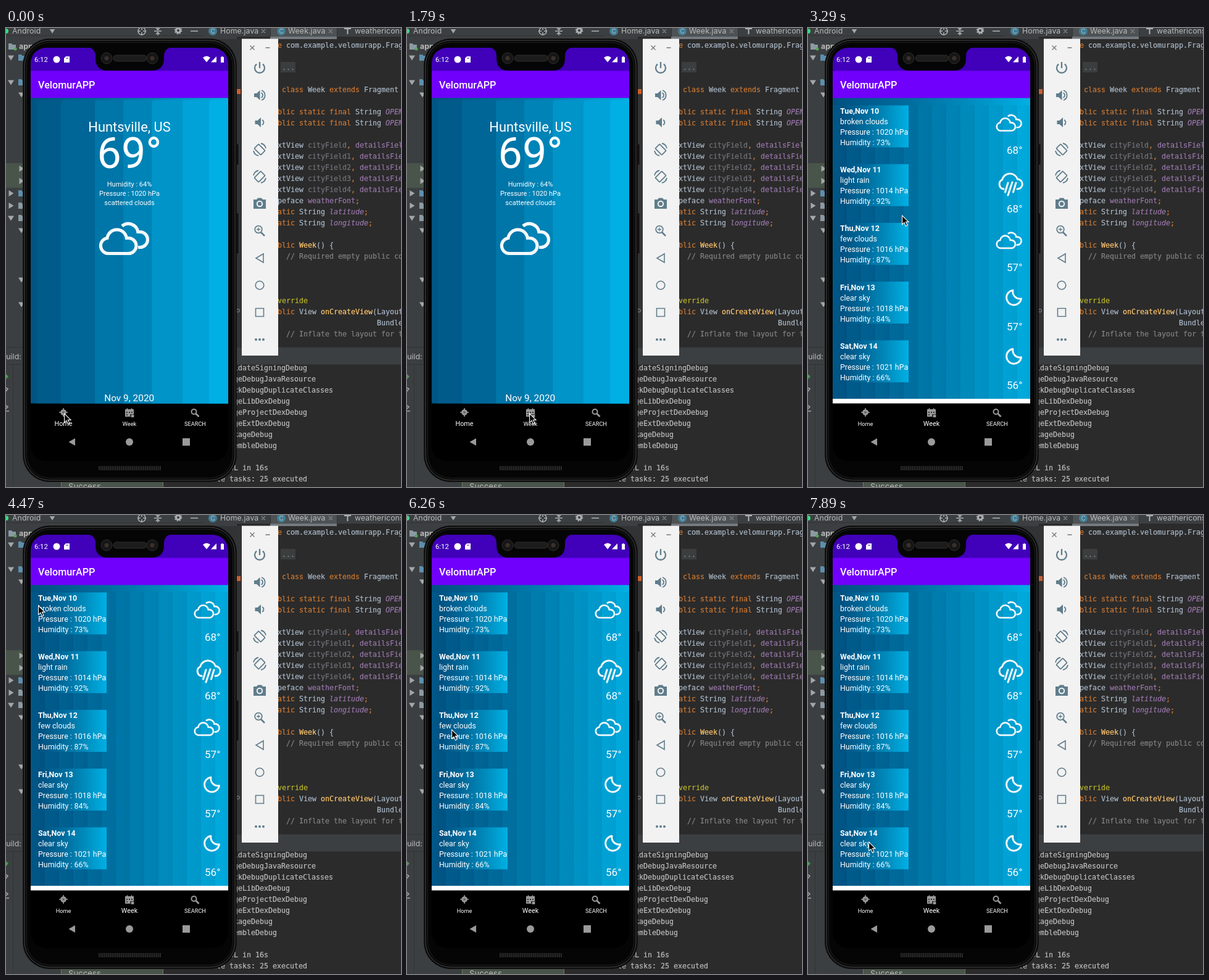
An HTML page for the animation above (8000 ms loop, 640 by 744 pixels).

```html
<!DOCTYPE html>
<html lang="en">
<head>
<meta charset="utf-8">
<title>Weather app demo</title>
<style>
html, body { margin: 0; width: 100%; height: 100%; overflow: hidden; background: #2b2b2b; }
svg { display: block; }
text { white-space: pre; }
.phone text { font-family: Roboto, sans-serif; fill: #fff; }
.code text { font: 11.63px "DejaVu Sans Mono", Menlo, monospace; }
.code { color: #a9b7c6; }
.code text, .code tspan { fill: currentColor; stroke: currentColor; stroke-width: .22px; }
.ide text { font: 12.3px Inter, sans-serif; fill: #bbb; letter-spacing: .1px; }
.k { color: #cc7832; }
.f { color: #9876aa; }
.i { font-style: italic; }
.m { color: #ffc66d; }
.c { color: #808080; }
.u { color: #72737a; }
.a { color: #bbb529; }
#log { color: #bbb; }
.line { fill: none; stroke: #f4f8fa; }
.mid { text-anchor: middle; }
.tools { fill: none; stroke: #607d8b; stroke-width: 1.8; }
.tools .s { fill: #607d8b; stroke: none; }

.home, .week, .big, .small, .cursor { animation: 8s step-end -2ms infinite; }
.home { animation-name: leave; }
.week { animation-name: enter; }
.big { animation-name: shrink; }
.small { animation-name: grow; }
.cursor { animation-name: move; }
@keyframes leave { 0% { visibility: visible } 31.75%, 100% { visibility: hidden } }
@keyframes enter { 0% { visibility: hidden } 31.75%, 100% { visibility: visible } }
@keyframes shrink { 0% { font-size: 10.8px } 31.75% { font-size: 10px } 33.625%, 100% { font-size: 9.2px } }
@keyframes grow { 0% { font-size: 9.2px } 31.75% { font-size: 10px } 33.625%, 100% { font-size: 10.8px } }
@keyframes move {
  0% { transform: translate(94px, 624px) }
  1.875% { transform: translate(91px, 624px) }
  3.75% { transform: translate(89px, 624px) }
  13.125% { transform: translate(95px, 623px) }
  15% { transform: translate(120px, 621px) }
  16.875% { transform: translate(152px, 620px) }
  18.625% { transform: translate(180px, 621px) }
  20.5% { transform: translate(194px, 623px) }
  22.375% { transform: translate(198px, 624px) }
  37.375% { transform: translate(202px, 570px) }
  39.25% { transform: translate(172px, 400px) }
  41.125% { transform: translate(152px, 303px) }
  50.375% { transform: translate(134px, 276px) }
  52.25% { transform: translate(98px, 218px) }
  54.125% { transform: translate(64px, 162px) }
  55.875% { transform: translate(52px, 146px) }
  57.75% { transform: translate(51px, 148px) }
  59.625% { transform: translate(52px, 156px) }
  61.5% { transform: translate(54px, 168px) }
  63.375% { transform: translate(57px, 182px) }
  65.25% { transform: translate(59px, 200px) }
  67.125% { transform: translate(61px, 222px) }
  69% { transform: translate(64px, 246px) }
  70.875% { transform: translate(66px, 268px) }
  72.75% { transform: translate(69px, 292px) }
  74.625% { transform: translate(71px, 315px) }
  76.5% { transform: translate(72px, 334px) }
  78.25% { transform: translate(72px, 347px) }
  83.875% { transform: translate(72px, 372px) }
  85.75% { transform: translate(72px, 422px) }
  87.5% { transform: translate(72px, 455px) }
  95% { transform: translate(77px, 474px) }
  96.75% { transform: translate(89px, 506px) }
  98.625%, 100% { transform: translate(98px, 529px) }
}
</style>
</head>
<body>
<svg width="640" height="744" viewBox="0 0 640 744">
<defs>
  <linearGradient id="sky">
    <stop stop-color="#005080"/><stop offset=".35" stop-color="#006a9b"/>
    <stop offset=".65" stop-color="#0088b9"/><stop offset="1" stop-color="#00b0e4"/>
  </linearGradient>
  <linearGradient id="saw" gradientUnits="userSpaceOnUse" x1="40" x2="63" spreadMethod="repeat">
    <stop stop-color="#00b0e4" stop-opacity=".07"/><stop offset="1" stop-color="#003860" stop-opacity=".1"/>
  </linearGradient>
  <clipPath id="screen"><rect x="40" y="32" width="320" height="670" rx="25"/></clipPath>
  <path id="open" d="M-5-3.500H5L0 4.500Z" fill="#a4a6a8"/>
  <path id="shut" d="M-3.500-5V5L4.500 0Z" fill="#a4a6a8"/>
  <path id="folder" d="M0-5H5L6.500-3H12V5H0Z"/>
  <g id="clouds" class="line" stroke-width="5.100">
    <path d="M165 365.500H198.500A12.500 12.500 0 0 0 198.500 340.500H195.300A15.800 15.800 0 0 0 164 340.500A12.600 12.600 0 0 0 165 365.500Z"/>
    <path d="M188 321A15.800 15.800 0 0 1 213.800 330.500H217A12.500 12.500 0 0 1 217 355.500H214"/>
  </g>
  <use id="cloudy" href="#clouds" transform="translate(225.400 -25) scale(.524)"/>
  <g id="rain" class="line" stroke-width="3" stroke-linecap="round" transform="translate(0 -95.200)">
    <path d="M317 261A8 8 0 0 1 314.500 246A13 13 0 0 1 339.500 245A8 8 0 0 1 339 261"/>
    <path d="M324 251L319.500 266M331 250L324 271M337 251L332.500 266"/>
  </g>
  <path id="moon" class="line" stroke-width="2.900" stroke-linejoin="round" d="M332 141.500A12 12 0 1 0 345.500 155A11.500 11.500 0 0 1 332 141.500Z"/>
  <g id="turn">
    <rect x="-5" y="-7.500" width="10" height="15" rx="1" transform="rotate(-45)"/>
    <path d="M2-10A10.200 10.200 0 0 1 10-2M-2 10A10.200 10.200 0 0 1-10 2"/>
  </g>
</defs>

<g class="ide">
  <path fill="#3c3f41" d="M0 0H640V14H374V18H0Z"/>
  <path fill="#3c3f41" d="M0 0H322V744H0Z"/>
  <path fill="#313335" d="M322 18H390V518H322Z"/>
  <path fill="#4e5254" d="M428 0H536V14H428Z"/>
  <path fill="#747a80" d="M428 14H536V18H428Z"/>
  <path fill="#323232" d="M0 12H320V13H0ZM428 0H429V14H428ZM536 0H537V14H536Z"/>
  <circle cx="0" cy="5" r="4" fill="#3ddc84"/>
  <text x="10" y="9">Android</text>
  <use href="#open" transform="translate(75 5) scale(.85)"/>
  <g fill="none" stroke="#afb1b3" stroke-width="1.500">
    <path d="M220-2V3M220 7V12M213 5H218M222 5H227M240 5H252M246-2V3M246 12V7M243 0L246 3L249 0M243 10L246 7L249 10M299 5H311"/>
    <circle cx="220" cy="5" r="6"/>
    <circle cx="279" cy="4" r="3.500" stroke-width="3"/>
    <circle cx="279" cy="4" r="5.500" stroke-dasharray="2.200 2.100"/>
    <path stroke="#7d8082" d="M414 2L420 8M420 2L414 8M523 2L529 8M529 2L523 8"/>
  </g>
  <circle cx="335" cy="5" r="7" fill="#3f7d96"/>
  <circle cx="446" cy="5" r="7" fill="#3f7d96"/>
  <text x="331.500" y="8.500" style="font-size:10px">C</text>
  <text x="442.500" y="8.500" style="font-size:10px">C</text>
  <text x="347" y="9">Home.java</text>
  <text x="457" y="9">Week.java</text>
  <path d="M548 1H559M553.500 1V10" stroke="#afb1b3" stroke-width="2"/>
  <text x="565" y="9">weathericons</text>

  <path fill="#49544a" d="M0 219H40V259H0Z"/>
  <use href="#folder" x="4" y="30" fill="#8b9aa3"/>
  <circle cx="15" cy="34" r="2.500" fill="#57a55a"/>
  <text x="21" y="34" style="font-weight:700">app</text>
  <g fill="#5c8fae">
    <use href="#folder" x="20" y="48"/><use href="#folder" x="20" y="88"/><use href="#folder" x="20" y="268"/>
  </g>
  <g fill="#8b9aa3"><use href="#folder" x="20" y="288"/><use href="#folder" x="20" y="308"/></g>
  <use href="#open" x="8" y="48"/><use href="#open" x="8" y="88"/><use href="#open" x="8" y="308"/>
  <use href="#shut" x="8" y="268"/><use href="#shut" x="8" y="288"/>
  <use href="#open" x="25" y="108"/><use href="#open" x="25" y="328"/><use href="#open" x="25" y="408"/><use href="#open" x="25" y="448"/>
  <use href="#shut" x="25" y="228"/><use href="#shut" x="25" y="248"/>

  <path fill="#3c3f41" d="M0 518H640V545H0Z"/>
  <path fill="#323232" d="M0 517H640V518H0ZM0 545H640V546H0ZM11 546H12V744H11Z"/>
  <text x="-8" y="537">Build:</text>
  <path fill="#499c54" d="M0 561L4 565L0 569Z"/>
  <path d="M-2 582L3 585L-1 590M-3 610L3 614L-1 618M-2 621H5" fill="none" stroke="#a4a6a8" stroke-width="1.500"/>
  <path fill="#2b2b2b" d="M254 546H400V744H254Z"/>
  <path fill="#49544a" stroke="#6a7a63" d="M89.500 734.500H254.500V750H89.500Z"/>
  <text x="101" y="748" style="font-size:13px">Success</text>
  <path fill="#c75f2f" d="M374 99H380V107H374Z"/>
  <circle cx="376" cy="458" r="2.500" fill="none" stroke="#8a8d90"/>
</g>

<g class="code">
  <text x="440" y="32"><tspan class="k">e</tspan> com.example.velomurapp.Frag</text>
  <path fill="#3b3d3e" d="M445 55H469V72H445Z"/>
  <text x="447" y="68" class="c">...</text>
  <text x="447" y="104"><tspan class="k">class</tspan> Week <tspan class="k">extends</tspan> Fragment</text>
  <text x="426" y="140"><tspan class="k">public static final</tspan> String <tspan class="f i">OPEN</tspan></text>
  <text x="426" y="158"><tspan class="k">public static final</tspan> String <tspan class="f i">OPEN</tspan></text>
  <g id="fields"></g>
  <text x="426" y="284">Typeface <tspan class="f">weatherFont</tspan><tspan class="k">;</tspan></text>
  <text x="426" y="302"><tspan class="k">static</tspan> String <tspan class="f i">latitude</tspan><tspan class="k">;</tspan></text>
  <text x="426" y="320"><tspan class="k">static</tspan> String <tspan class="f i">longitude</tspan><tspan class="k">;</tspan></text>
  <text x="426" y="356"><tspan class="k">public</tspan> <tspan class="m">Week</tspan>() {</text>
  <text x="454" y="374" class="c">// Required empty public constructor</text>
  <text x="426" y="446" class="a">@Override</text>
  <text x="426" y="464"><tspan class="k">public</tspan> View <tspan class="m">onCreateView</tspan>(LayoutInflater</text>
  <text x="601" y="482">Bundle</text>
  <text x="454" y="500" class="c">// Inflate the layout for this</text>
  <g id="log"></g>
</g>

<g class="phone">
  <path fill="#111" stroke="#444" stroke-width=".6" d="M371 188H377V222H371ZM371 300H377V366H371Z"/>
  <rect x="27.500" y="17.500" width="346" height="718" rx="43" fill="#0a0a0a" stroke="#141414"/>
  <rect x="30" y="20" width="341" height="713" rx="41" fill="none" stroke="#484848"/>
  <rect x="33.500" y="23.500" width="334" height="706" rx="38" fill="#050505" stroke="#1e1e1e"/>
  <g clip-path="url(#screen)">
    <path fill="#4100b9" d="M40 32H360V70H40Z"/>
    <path fill="#7000fb" d="M40 69.500H360V114H40Z"/>
    <path fill="#000" d="M40 608H360V702H40Z"/>
  </g>
  <path fill="#050505" d="M130 31Q145 32 145 46V49Q145 69 165 69H236Q256 69 256 49V46Q256 32 271 31Z"/>
  <rect x="174" y="44" width="54" height="10" rx="5" fill="#1c1c1c" stroke="#2d2d2d"/>
  <g fill="#161616" stroke="#2e2e2e"><circle cx="163" cy="49" r="9"/><circle cx="237" cy="49" r="9"/></g>
  <g fill="#3a302b"><circle cx="163" cy="49" r="3.500"/><circle cx="237" cy="49" r="3.500"/></g>
  <path d="M150 713.500H252" stroke="#2a2a2a" stroke-width="7" stroke-dasharray="2 1"/>

  <text x="46" y="55" font-size="11.300">6:12</text>
  <g fill="#fff">
    <circle cx="82" cy="51" r="5.500"/>
    <path d="M97 46H103V56H94V49ZM319 48Q325 43 331 48L325 55.500ZM341 46V55.500H332ZM348 47H349.500V46H351.500V47H353V56H348Z"/>
  </g>
  <path d="M98 48V50M100 48V50" stroke="#4100b9"/>
  <text x="52" y="98" font-size="16.200" font-weight="500">VelomurAPP</text>

  <g class="home">
    <path fill="#005583" d="M40 113.500H360V608.500H40Z"/>
    <path fill="url(#sky)" d="M40 113.500H360V117H40Z"/>
    <g id="bands"></g>
    <path d="M236.500 118V608" stroke="#00a0d0" stroke-opacity=".5"/>
    <g class="mid">
      <text x="200" y="167.500" font-size="21.900">Huntsville, US</text>
      <text x="200" y="227" font-size="70">69°</text>
      <g font-size="11">
        <text x="200" y="257">Humidity : 64%</text>
        <text x="200" y="271.500">Pressure : 1020 hPa</text>
        <text x="200" y="286.500">scattered clouds</text>
      </g>
      <text x="199.700" y="604.500" font-size="15.400">Nov 9, 2020</text>
    </g>
    <use href="#clouds"/>
  </g>

  <g class="week">
    <path fill="url(#sky)" d="M40 113.500H360V601H40Z"/>
    <path fill="url(#saw)" d="M40 125H360V601H40Z"/>
    <path fill="#fff" d="M40 601H360V608.500H40Z"/>
    <g id="days" font-size="12.400"></g>
  </g>

  <g fill="#9a9a9a">
    <circle cx="93" cy="623" r="4.800"/>
    <path d="M92.200 616H93.800V630H92.200ZM86 622.200H100V623.800H86Z"/>
    <circle cx="93" cy="623" r="2" fill="#666"/>
    <path d="M193 618H195.500V616.500H197.500V618H202.500V616.500H204.500V618H207V630H193Z"/>
    <path fill="#333" d="M195 622H197V624H195ZM199 622H201V624H199ZM203 622H205V624H203ZM195 626H197V628H195ZM201 626H208V631H201Z"/>
    <path d="M203 627H207V631H203Z"/>
    <path d="M112 665V677L101.500 671ZM286 665H298V677H286Z"/>
    <circle cx="200" cy="671" r="6"/>
  </g>
  <g fill="none" stroke="#9a9a9a" stroke-width="2"><circle cx="304.500" cy="622" r="4"/><path d="M307.500 625L312.500 630" stroke-width="2.600"/></g>
  <g class="mid">
    <text x="93" y="644.500" class="big">Home</text>
    <text x="200" y="644.500" class="small">Week</text>
    <text x="306.500" y="644.500" font-size="9.200">SEARCH</text>
  </g>
</g>

<g class="tools">
  <path fill="#f2f2f2" stroke="none" d="M382 17.500H441V531H382Z"/>
  <path d="M395.500 28.500L402.500 35.500M402.500 28.500L395.500 35.500M420.500 32H427.500" stroke="#777" stroke-width="1.400"/>
  <path d="M411 55V65M406 58.500A8 8 0 1 0 416 58.500" stroke-width="2.300"/>
  <path class="s" d="M402 106H406L411.500 101V117L406 112H402ZM403.500 150H407.500L413 145V161L407.500 156H403.500Z"/>
  <path d="M413.500 105A4.500 4.500 0 0 1 413.500 113M414 101A8.500 8.500 0 0 1 414 117M415 149A4.500 4.500 0 0 1 415 157"/>
  <use href="#turn" x="411" y="197"/>
  <use href="#turn" transform="translate(411 241) scale(-1 1)"/>
  <path class="s" d="M401 278H406L408 275.500H414L416 278H421V293H401Z"/>
  <circle cx="411" cy="285" r="4.200" fill="#607d8b" stroke="#f2f2f2" stroke-width="2"/>
  <circle cx="409" cy="326.500" r="5.800"/>
  <path d="M413 331L419 337" stroke-width="2.500"/>
  <path d="M409 323.500V329.500M406 326.500H412" stroke-width="1.300"/>
  <path d="M417 366V380L405 373Z" stroke-width="1.600"/>
  <circle cx="411" cy="417" r="6.800" stroke-width="1.600"/>
  <path d="M404.500 454.500H417.500V467.500H404.500Z" stroke-width="1.600"/>
  <g class="s"><circle cx="405" cy="505" r="2"/><circle cx="411" cy="505" r="2"/><circle cx="417" cy="505" r="2"/></g>
</g>

<path class="cursor" d="M.6 1V15.500L4 12.400L6.400 18L8.900 17L6.500 11.400H11Z" fill="#000" stroke="#fff" stroke-width="1.100"/>
</svg>
<script>
const fill = (id, list, draw) => {
  document.getElementById(id).innerHTML = list.map(draw).join('');
};

fill('fields', ['', 1, 2, 3, 4], (n, i) =>
  `<text x="426" y="${194 + 18 * i}">TextView <tspan class="u">cityField${n}</tspan><tspan class="k">,</tspan> <tspan class="f">detailsField${n}</tspan></text>`);

const tasks = ['validateSigningDebug', 'mergeDebugJavaResource', 'checkDebugDuplicateClasses',
  'mergeLibDexDebug', 'mergeProjectDexDebug', 'mergeExtDexDebug', 'packageDebug', 'assembleDebug'];
const log = [...tasks.map(name => '&gt; Task :app:' + name), '',
  'BUILD SUCCESSFUL in 16s', '25 actionable tasks: 25 executed'];
fill('log', log, (s, i) => `<text x="264" y="${555 + 18 * i}">${s}</text>`);

const bands = [[50, '#005b8a'], [89, '#006697'], [144, '#0075a7'], [190, '#0083b6'],
  [237, '#0094c8'], [286, '#00a2d7'], [329, '#00afe4']];
fill('bands', bands, ([x, color]) =>
  `<path fill="${color}" d="M${x} 608.5V121Q${x} 117 ${x + 4} 117H360V608.5Z"/>`);

const days = [
  ['Tue,Nov 10', 'broken clouds', 1020, 73, 68, 'cloudy'],
  ['Wed,Nov 11', 'light rain', 1014, 92, 68, 'rain'],
  ['Thu,Nov 12', 'few clouds', 1016, 87, 57, 'cloudy'],
  ['Fri,Nov 13', 'clear sky', 1018, 84, 57, 'moon'],
  ['Sat,Nov 14', 'clear sky', 1021, 66, 56, 'moon']
];
fill('days', days, ([day, sky, pressure, humidity, temp, icon], i) => `
  <g transform="translate(0 ${95.2 * i})">
    <rect x="52" y="125.500" width="111" height="68" fill="url(#sky)"/>
    <text x="52" y="139" font-weight="700">${day}</text>
    <text x="52" y="156">${sky}</text>
    <text x="52" y="173">Pressure : ${pressure} hPa</text>
    <text x="52" y="190">Humidity : ${humidity}%</text>
    <use href="#${icon}" y="${icon == 'moon' ? -2 : 0}"/>
    <text x="347.500" y="204" font-size="17" text-anchor="end">${temp}°</text>
  </g>`);
</script>
</body>
</html>
```
